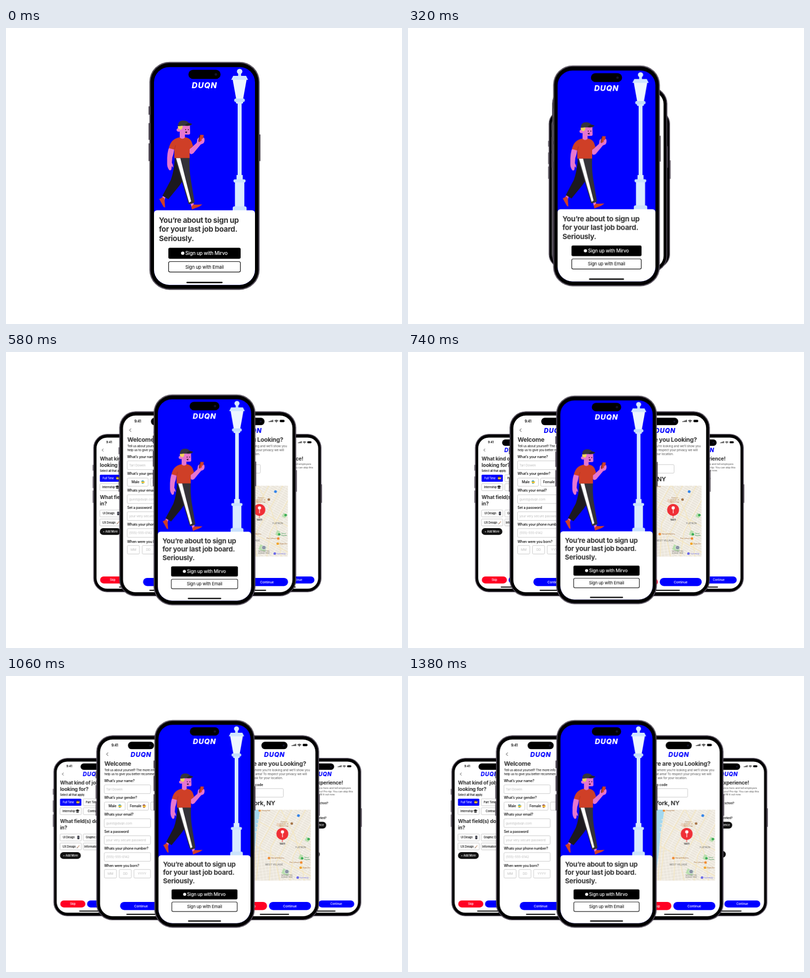
Write an HTML page that moves like this. It is 800x600 px and loops after 3020 ms.

```html
<!DOCTYPE html>
<html lang="en">
<head>
<meta charset="utf-8">
<title>Job board sign-up</title>
<style>
  html, body { margin: 0; width: 100%; height: 100%; overflow: hidden; background: #fff; }
  svg { display: block; width: 100vw; height: 100vh; }
  text { font-family: Inter, "Liberation Sans", sans-serif; letter-spacing: -.02em; }

  .main { animation: shrink 3020ms infinite; transform-origin: 401px 299.7px; }
  .side { animation: slide 3020ms infinite; }
  @keyframes shrink {
    0%, 4.636% { transform: scale(1); animation-timing-function: ease; }
    31.13%, 100% { transform: scale(.911); }
  }
  @keyframes slide {
    0%, 4.636% { transform: translateX(var(--dx)); animation-timing-function: ease; }
    44.37%, 100% { transform: translateX(0); }
  }

  .logo { font: italic 800 16px Inter, sans-serif; letter-spacing: .06em; text-anchor: middle; fill: var(--logo, #00f); }
  .mid { text-anchor: middle; }
  .end { text-anchor: end; }
  .h1 { font-size: 15px; font-weight: 700; fill: #333; }
  .h2 { font-size: 12.2px; font-weight: 700; fill: #333; }
  .h3 { font-size: 10.3px; font-weight: 700; fill: #333; }
  .label { font-size: 7px; font-weight: 500; }
  .note { font-size: 6.3px; }
  .hint { font-size: 6.5px; fill: #bdbdbd; }
  .tiny { font-size: 5.5px; font-weight: 500; }
  .fine { font-size: 5.3px; }
  .grey { fill: #555; }
  .white { fill: #fff; }
  .box { fill: #fff; stroke: #bcbcbc; stroke-width: .8; }
  .act { font-size: 8.2px; font-weight: 500; fill: #fff; text-anchor: middle; }
  .place { font-size: 4.4px; fill: #666; text-anchor: middle; letter-spacing: 0; }
  .poi { font-size: 3.6px; fill: #a8703c; letter-spacing: 0; }
  .road { fill: none; stroke: #f5e6bd; stroke-width: 1.4; }
  .skin { fill: #e676cf; }
  .red { fill: #cf3f27; }
</style>
</head>
<body>
<svg viewBox="0 0 800 600" preserveAspectRatio="none">
  <defs>
    <!-- phone parts, centred on 0,0 -->
    <g id="body">
      <path d="M-112-141v17M-112-107v34M-112-66v36M112-84v54" stroke="#4f4753" stroke-width="2"/>
      <rect x="-111.2" y="-231" width="222.4" height="462" rx="40.5" fill="#1a171c"/>
      <rect x="-110.6" y="-230.4" width="221.2" height="460.8" rx="40" fill="#71677a"/>
      <rect x="-109.2" y="-229" width="218.4" height="458" rx="38.5"/>
      <rect x="-102" y="-220.5" width="204" height="441.5" rx="31" fill="currentColor"/>
    </g>
    <g id="top">
      <rect x="-32.5" y="-215" width="65" height="18.5" rx="9.25"/>
      <circle cx="23" cy="-205.7" r="2.6" fill="#15152a"/>
      <text class="logo" y="-177.7">DUQN</text>
      <rect x="-36.5" y="214.8" width="73" height="2.7" rx="1.3"/>
    </g>
    <g id="phone">
      <use href="#body" color="#fff"/>
      <use href="#top"/>
      <text class="mid" x="-65.5" y="-203.5" font-size="8.6" font-weight="600">9:41</text>
      <path d="M-82-188l-3.8 4 3.8 4" fill="none" stroke="#222" stroke-width="1.2"/>
      <path d="M43-204.2v-2h1.8v2zM46-204.2v-3.2h1.8v3.2zM49-204.2v-4.4h1.8v4.4zM52-204.2v-5.8h1.8v5.8z"/>
      <path d="M57.5-207.2q4.5-4 9 0M59.3-205.4q2.7-2.4 5.4 0" fill="none" stroke="#000" stroke-width="1.4"/>
      <circle cx="62" cy="-204.1" r="1"/>
      <rect x="70.5" y="-209.8" width="11.5" height="5.8" rx="1.8"/>
      <path d="M83-208v2.2" stroke="#888"/>
    </g>
    <g id="pair">
      <rect x="-91.5" y="185.2" width="73" height="20.4" rx="10.2" fill="#ff0023"/>
      <rect x="-13.5" y="185.2" width="104.5" height="20.4" rx="10.2" fill="#00f"/>
      <text class="act" x="-55" y="198.4">Skip</text>
      <text class="act" x="38.5" y="198.4">Continue</text>
    </g>
    <rect id="field" class="box" x="193.8" width="93.5" height="17.6" rx="2"/>
    <rect id="chip" class="box" width="43" height="14" rx="1.5"/>
    <g id="face">
      <circle r="2.7" fill="#f5c332"/>
      <path d="M-2.8-.6a2.8 2.8 0 0 1 5.6 0Q0-2-2.8-.6zM-2.4 3.5q2.4-3 4.8 0z" fill="currentColor"/>
      <path d="M2.6 2.5l1.2-4" stroke="#f5c332" stroke-width="1.2"/>
    </g>

    <clipPath id="screen"><rect x="299" y="79.2" width="204" height="441.5" rx="31"/></clipPath>
    <clipPath id="mapArea"><rect x="473" y="271" width="147.5" height="143.5"/></clipPath>
    <pattern id="blocks" width="14" height="4.6" patternUnits="userSpaceOnUse" patternTransform="rotate(29)">
      <path d="M0 0H14M0 0V4.6" stroke="#fbf8f1" stroke-width="1.7"/>
    </pattern>
    <pattern id="lanes" width="7" height="6" patternUnits="userSpaceOnUse" patternTransform="rotate(-8)">
      <path d="M0 0H7M0 0V6" stroke="#fbf8f1" stroke-width="1.6"/>
    </pattern>
  </defs>

  <!-- outer left -->
  <g class="side" style="--dx:241.75px">
    <g transform="translate(165 326.5) scale(.694)"><use href="#phone"/><use href="#pair"/></g>
    <text class="h3" x="101" y="219.7">What kind of job</text>
    <text class="h3" x="101" y="232.7">looking for?</text>
    <text class="tiny" x="101" y="243">Select all that apply.</text>
    <use href="#chip" x="101" y="267"/><use href="#chip" x="148" y="249"/><use href="#chip" x="148" y="267"/>
    <rect x="101" y="248.7" width="43" height="14.3" rx="1.5" fill="#00f"/>
    <text class="tiny white" x="106.5" y="258">Full Time</text>
    <use href="#face" x="136.5" y="255.5" color="#4b3a2c"/>
    <text class="tiny" x="153" y="258">Part Time</text>
    <text class="tiny" x="106" y="276">Internship</text>
    <path d="M132 272.6l4.3-2.4 4.3 2.4-4.3 2.2zM133.8 274v2.4q2.5 1.4 5 0V274l-2.5 1.4z" fill="#222"/>
    <text class="tiny" x="157" y="276">Contract</text>
    <text class="h3" x="101" y="297.5">What field(s) do</text>
    <text class="h3" x="101" y="310.7">in?</text>
    <use href="#chip" x="101" y="320.3"/><use href="#chip" x="148" y="320.3"/>
    <use href="#chip" x="101" y="338.5"/><use href="#chip" x="148" y="338.5"/>
    <text class="tiny" x="106.5" y="329.4">UI Design</text>
    <rect x="136" y="323.7" width="4" height="7" rx=".8" fill="#25252d"/>
    <path d="M137 325h2v3.6h-2z" fill="#666b7d"/>
    <text class="tiny" x="153" y="329.4">Graphic Design</text>
    <text class="tiny" x="106" y="347.6">UX Design</text>
    <path d="M135.5 348.5l4.5-5" stroke="#c9a287" stroke-width="1.5"/>
    <path d="M135 349.2l1.5-1.6" stroke="#444"/>
    <text class="tiny" x="150" y="347.6">Information</text>
    <rect x="101" y="357" width="42" height="13.8" rx="6.9" fill="#111"/>
    <text class="tiny white mid" x="122" y="366">+ Add More</text>
  </g>

  <!-- outer right -->
  <g class="side" style="--dx:-241.75px">
    <g transform="translate(648.5 326.5) scale(.694)"><use href="#phone"/><use href="#pair"/></g>
    <g class="end">
      <text class="h3" x="689" y="219.7">Your Experience!</text>
      <text class="fine grey" x="705" y="229">Add your experience here and tell employers</text>
      <text class="fine grey" x="709" y="235.5">more about you! Pro-tip: You can skip this</text>
      <text class="fine grey" x="673" y="242">and fill it out now.</text>
      <text class="tiny" x="659" y="260.3">Where did you go to school?</text>
      <text class="tiny" x="655.5" y="290">Where have you worked?</text>
      <rect x="584" y="295.5" width="71" height="13.8" rx="6.9" fill="#111"/>
      <text class="tiny white" x="650" y="304.4">+ Add Experience</text>
      <rect x="584" y="354.5" width="58" height="13.8" rx="6.9" fill="#111"/>
    </g>
  </g>

  <!-- inner left -->
  <g class="side" style="--dx:139.5px">
    <g transform="translate(268 307.7) scale(.811)">
      <use href="#phone"/>
      <rect x="-52" y="185.2" width="104" height="20.4" rx="10.2" fill="#00f"/>
      <text class="act" y="198.4">Continue</text>
    </g>
    <text class="h2" x="194" y="182.3">Welcome</text>
    <text class="note" x="194" y="192.8">Tell us about yourself! The more info</text>
    <text class="note" x="194" y="200.5">help us to give you better recommen</text>
    <g class="label">
      <text x="193.7" y="214.5">What’s your name?</text>
      <text x="193.7" y="249">What’s your gender?</text>
      <text x="193.7" y="283.3">Whats your email?</text>
      <text x="193.7" y="317.8">Set a password</text>
      <text x="193.7" y="352.2">Whats your phone number?</text>
      <text x="193.7" y="386.5">When were you born?</text>
      <use href="#field" y="220.7"/><use href="#field" y="289.4"/>
      <use href="#field" y="323.8"/><use href="#field" y="358"/>
      <rect class="box" x="194" y="255.5" width="42" height="16.6" rx="2"/>
      <rect class="box" x="240.5" y="255.5" width="42.5" height="16.6" rx="2"/>
      <rect class="box" x="287.5" y="255.5" width="42" height="16.6" rx="2"/>
      <text x="202.5" y="266.4">Male</text>
      <text x="245.5" y="266.4">Female</text>
    </g>
    <use href="#face" x="225" y="263.6" color="#31a3b8"/>
    <use href="#face" x="274" y="263.6" color="#87455c"/>
    <g class="hint">
      <text x="197.5" y="231.9">Tarl Dowen</text>
      <text x="197.5" y="300.6">guest@duqn.com</text>
      <text x="197.5" y="334.9">your very secure password</text>
      <text x="197.5" y="369.2">(555)-555-0142</text>
      <rect class="box" x="194" y="392.2" width="24.5" height="17.3" rx="2"/>
      <rect class="box" x="224" y="392.2" width="24.5" height="17.3" rx="2"/>
      <rect class="box" x="253.7" y="392.2" width="33.5" height="17.3" rx="2"/>
      <g class="mid">
        <text x="206.3" y="403.3">MM</text><text x="236.3" y="403.3">DD</text><text x="270" y="403.3">YYYY</text>
      </g>
    </g>
  </g>

  <!-- inner right -->
  <g class="side" style="--dx:-139.5px">
    <g transform="translate(547 307.7) scale(.811)"><use href="#phone"/><use href="#pair"/></g>
    <g class="end">
      <text class="h2" x="611" y="182.3">Where are you Looking?</text>
      <text class="note grey" x="618.5" y="193.2">Tell us where you’re looking and we’ll show you</text>
      <text class="note grey" x="612.5" y="201.2">jobs in that area! To respect your privacy we will</text>
      <text class="note grey" x="564" y="209.2">only ask for your location.</text>
      <text class="label" x="524" y="222.5">Enter zip code</text>
      <text class="h2" x="548.5" y="262.3">New York, NY</text>
    </g>
    <rect class="box" x="473" y="228.3" width="92" height="17.3" rx="2"/>
    <g clip-path="url(#mapArea)">
      <path d="M473 271h148v144H473z" fill="#ebe6dc"/>
      <path d="M473 271h148v144H473z" fill="url(#blocks)"/>
      <path d="M473 340l37 4 40 18 15 53h-92z" fill="#ebe6dc"/>
      <path d="M473 340l37 4 40 18 15 53h-92z" fill="url(#lanes)"/>
      <path d="M473 271h45l-3 20-5 28-3 36-4 30-4 30h-26z" fill="#a3d8ef"/>
      <path d="M512 291l7 2M510 299l7 2M509 307l7 2M508 316l7 2" stroke="#ebe6dc" stroke-width="2"/>
      <path class="road" d="M521 271l-9 52-7 92M558 271l-40 72-8 72M582 271l-42 76-3 68M610 271l-60 108 8 36M621 300l-36 65-7 50M510 345l112 62M517 296l104 58"/>
      <path class="road" d="M560 271l28 52 13 46 6 46"/>
      <path d="M565 390l13 5-4 10-13-5zM599 361l6 3-4 9-6-3zM612 326l7 4-4 7-7-4z" fill="#b9dfae"/>
      <path d="M553 297l10 5-3 6-10-5z" fill="#ead4bf"/>
      <g>
        <circle cx="595.5" cy="283" r="2.8" fill="#3083ea"/>
        <circle cx="582" cy="299" r="2.6" fill="#a57547"/>
        <circle cx="536" cy="369" r="2.6" fill="#f08a32"/>
        <circle cx="603" cy="369.5" r="2.6" fill="#3bae55"/>
        <circle cx="601" cy="378" r="2.6" fill="#f08a32"/>
        <circle cx="600" cy="388.5" r="2.6" fill="#f2a52b"/>
        <circle cx="616" cy="330.5" r="2.6" fill="#3bae55"/>
        <circle cx="594" cy="408.5" r="2.6" fill="#6a68ea"/>
        <circle cx="517" cy="273" r="2.3" fill="#f08a32"/>
        <circle cx="572" cy="396.5" r="4.2" fill="#8b94a5" stroke="#fff" stroke-width=".8"/>
      </g>
      <g class="poi">
        <text x="521" y="274.2">Dining Hall</text>
        <text class="mid" x="566" y="296.5">Fashion</text>
        <text class="mid" x="566" y="300.5">Institute of</text>
        <text class="mid" x="566" y="304.5">Technology</text>
        <text x="540" y="370.3">Marigold Bakery</text>
        <text class="end" x="597.5" y="379.3">Pim Larkson</text>
        <text x="607" y="369" fill="#2f9147">Union</text>
        <text x="607" y="373" fill="#2f9147">Square</text>
        <text x="604" y="389.8">Night Bar</text>
        <text x="598" y="409.8" fill="#6a68ea">Coworking</text>
      </g>
      <text class="place" x="600" y="348.5">FLATIRON</text>
      <text class="place" x="546" y="384" style="font-size:5px">WEST VILLAGE</text>
      <text class="place" x="572" y="405" style="font-size:3.3px">WASHINGTON</text>
      <text class="place" x="572" y="409" style="font-size:3.3px">SQUARE PARK</text>
      <circle cx="563" cy="320" r="12" fill="#f02f36"/>
      <path d="M561 331h4l-2 3z" fill="#f02f36"/>
      <circle cx="563.2" cy="316" r="3.2" fill="#fff"/>
      <path d="M563.2 319v8" stroke="#fff" stroke-width="1.3"/>
      <circle cx="563" cy="335.3" r="1" fill="#f02f36"/>
      <text class="place" x="563" y="341.5" style="fill:#222;font-weight:600">10011</text>
    </g>
  </g>

  <!-- front phone -->
  <g class="main">
    <use href="#body" color="#00f" x="401" y="299.7"/>
    <g clip-path="url(#screen)">
      <!-- street lamp -->
      <g fill="#d9ebff">
        <path d="M469 91h6v7h-6z" fill="#c5dffb"/>
        <circle cx="472" cy="88.2" r="5.5"/>
        <path d="M458 105h28l-7 39h-14z" fill="#edf6ff"/>
        <path d="M459 97h26l4 8h-34z" fill="#cfe5ff"/>
        <rect x="464.5" y="147" width="14.5" height="6.3" rx="2" fill="#d4e8ff"/>
        <rect x="461" y="143" width="21.5" height="6.8" rx="3.4" fill="#c2dcfa"/>
        <path d="M468 153h8v146h-8z"/>
        <path d="M465.7 298h12.6v10h-12.6zM462.5 312h19v50h-19z"/>
        <rect x="459.5" y="306.8" width="24.5" height="6.2" rx="3.1" fill="#c9e1fc"/>
        <rect x="458" y="361.5" width="28" height="12" rx="3.5" fill="#c9e1fc"/>
      </g>
      <!-- walker -->
      <path class="skin" d="M317 340l5 3-2 7-5-3zM372 353l6-1 2 9-5 3z"/>
      <path class="red" d="M309.5 346.500q4.500-.5 6-4l4.500 3 1.500 18q-2.500.5-3.500-1.500zM374.500 361q2 .5 3.500-3 9 0 18.500-.5-5 5-14 7.500l-7 3z"/>
      <path d="M341 263l28 1q1 24-9 42l-10 14-22 27-12-7 17-32q7-20 8-45z" fill="#1c191f"/>
      <path d="M341 263h30q-1 22 2 42l8 48q-5 4-12 4l-16-54z" fill="#343238"/>
      <path d="M343.500 263.500h8.500l22 88-4 2.500z" fill="#fff"/>
      <path class="skin" d="M330 241l10 2q-1 12-4 19l-1 11q3 5 3 10l-3-3-1 7q-3 3-5 0-4-6-3.500-14-.5-22 4.500-32z"/>
      <path class="skin" d="M370 238l4 5 11-10q2-4 1.500-8l6-6 8 4q2 7-2 11l-5 2-15 18q-6 4-7.500-1z"/>
      <path class="red" d="M351 221.500h11q9 1 13 9l3 9-7 6v18h-31v-17l-11-3q4-19 22-22z"/>
      <path d="M340.500 246l2-8" stroke="#a82f1c" stroke-width=".8"/>
      <path class="skin" d="M351 210h10.500v12q-5 5-10.500 0z"/>
      <path class="skin" d="M351 199l20.500-2 .5 16q0 3-3 3h-9q-7 0-9-6-6 1-6.500-3.500 1-4 5-3z"/>
      <path d="M347 199l10-1q0 7-4.500 8.500l-5-3z" fill="#f2d657"/>
      <path d="M347.500 199q-.5-11 10.500-11.500 8 0 10.500 4.500l7.500 2.500q-2.500 4-10 4-9-1-18.500.5z" fill="#36363c"/>
      <path d="M361 197.500q8 2 15-3l-8-2q-4 2-7 5z" fill="#222226"/>
      <path d="M362 205h1.700v2H362zM367.500 205h1.700v2h-1.700z" fill="#3a1530"/>
      <path d="M361.500 210.500l4-1 .3 3q-3 1.500-4.300-2z" fill="#3a1530"/>
      <path d="M391 217l1.700-.5-3.200 17-1.500-.5z" fill="#38202c"/>
      <path class="red" d="M392.500 216.500l7 .3-3 16.500-7-.3z"/>
      <path class="skin" d="M387 226q-2 3-1 7l6 2 6-2q3-4 1.500-9l-4 .5-.5 4-5 3z"/>
      <!-- sign-up sheet -->
      <rect x="299" y="369.5" width="204" height="170" rx="6" fill="#fff"/>
      <g class="h1">
        <text x="309" y="394.6">You’re about to sign up</text>
        <text x="309" y="413.2">for your last job board.</text>
        <text x="309" y="431.8">Seriously.</text>
      </g>
      <rect x="328" y="445.5" width="146" height="22.2" rx="3"/>
      <circle cx="357" cy="456.5" r="3.3" fill="#fff"/>
      <text class="white mid" x="405" y="460" font-size="10" font-weight="500">Sign up with Mirvo</text>
      <rect x="328.5" y="473.5" width="145" height="21.2" rx="3" fill="#fff" stroke="#000" stroke-width="1.2"/>
      <text class="mid" x="401" y="487.5" font-size="9.4">Sign up with Email</text>
    </g>
    <use href="#top" x="401" y="299.7" style="--logo:#fff"/>
  </g>
</svg>
</body>
</html>
```
